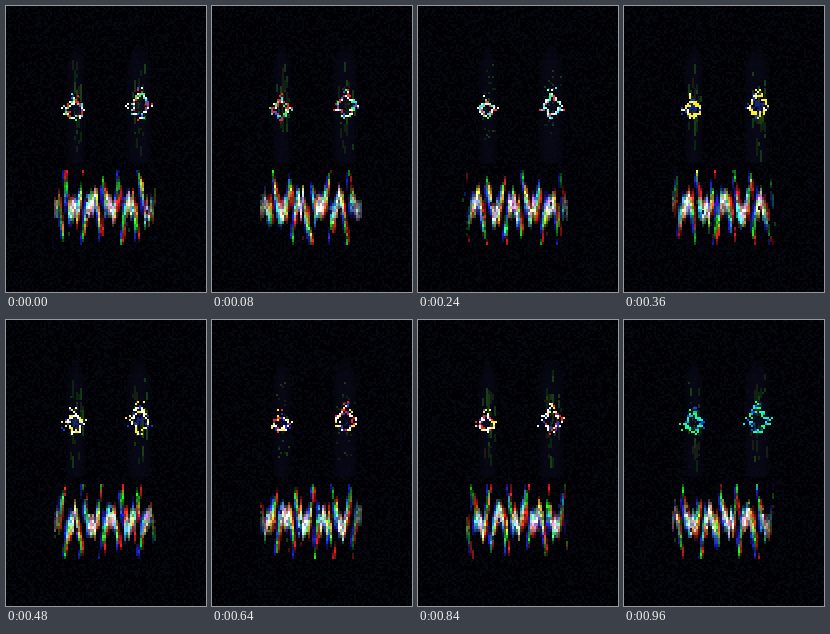
An HTML page with a canvas that plays this animation: 200x286 px, repeating every 1 s.

```html
<!DOCTYPE html>
<html lang="en">
<head>
<meta charset="utf-8">
<title>Glitch face</title>
<style>
html, body { margin: 0; width: 100%; height: 100%; overflow: hidden; background: #000; }
canvas { display: block; width: 200px; height: 286px; image-rendering: pixelated; }
</style>
</head>
<body>
<canvas id="stage" width="200" height="286"></canvas>
<script>
const ctx = document.getElementById('stage').getContext('2d');
const STEP = 40, STEPS = 25;
const TAU = Math.PI * 2;

function seeded(seed) {
  let a = seed * 7919 + 17;
  return () => {
    a = (a + 0x6D2B79F5) | 0;
    let t = Math.imul(a ^ (a >>> 15), 1 | a);
    t = (t + Math.imul(t ^ (t >>> 7), 61 | t)) ^ t;
    return ((t ^ (t >>> 14)) >>> 0) / 4294967296;
  };
}

function box(x, y, w, h, color) {
  ctx.fillStyle = color;
  ctx.fillRect(x, y, w, h);
}

const snap = v => Math.round(v / 2) * 2;
const pick = (list, rnd) => list[Math.floor(rnd() * list.length)];

// Eye colours hold for a stretch of steps; the ring itself flickers.
const mixed = ['#f22', '#f22', '#fff', '#fff', '#2ef', '#3f4', '#35f'];
const pale = ['#fff', '#fff', '#9ff', '#f33', '#3df', '#4f6'];
const gold = ['#fe2', '#fe2', '#fe2', '#fff', '#23c'];
const royal = ['#fff', '#fe2', '#fff', '#23e', '#fe2'];
const warm = ['#fff', '#fff', '#fe2', '#23e', '#f22'];
const ice = ['#1ef', '#2f6', '#14f', '#0bd', '#2f9'];
function palette(n) {
  if (n < 3) return mixed;
  if (n < 7) return pale;
  if (n < 11) return gold;
  if (n < 15) return royal;
  return n < 23 ? warm : ice;
}

function backdrop(rnd) {
  box(0, 0, 200, 286, '#010105');
  for (let y = 0; y < 286; y += 2)
    for (let x = 0; x < 200; x += 2)
      if (rnd() < 0.4) box(x, y, 2, 2, rnd() < 0.8 ? '#05050c' : '#080812');
}

function halo(cx, w, n, rnd) {
  for (let i = 0; i < 3; i++) {
    const inset = i * 3;
    box(cx - w / 2 + inset, 54 - i * 7, w - inset * 2, 102 + i * 8, 'rgba(9,9,26,.35)');
  }
  const dotted = n % 12 >= 3 && n % 12 <= 6;
  for (let i = 0; i < 34; i++) {
    const x = snap(cx + (rnd() + rnd() - 1) * w * 0.42);
    const y = snap(98 + (rnd() + rnd() - 1) * 48);
    const len = dotted ? 2 : 2 + snap(rnd() * 11);
    box(x, y, 2, len, pick(['#0b240d', '#143516', '#1c3c18', '#181c14'], rnd));
  }
}

// A ragged diamond ring with a flecked centre and stray sparks.
function eye(cx, cy, rx, ry, colors, rnd) {
  const dot = (x, y, color) => box(snap(x) - 1, snap(y) - 1, 2, 2, color);
  const core = colors === royal || colors === gold ? '#14208a' : '#0c0c24';
  for (let i = 0; i < 14; i++)
    dot(cx + (rnd() - 0.5) * rx, cy + (rnd() - 0.5) * ry, core);
  for (let i = 0; i < 52; i++) {
    const a = i / 52 * TAU;
    const c = Math.cos(a), s = Math.sin(a);
    const r = (0.68 + rnd() * 0.45) / Math.pow(Math.abs(c) + Math.abs(s), 0.6) * 1.2;
    dot(cx + c * rx * r, cy + s * ry * r, pick(colors, rnd));
  }
  for (let i = 0; i < 5; i++) {
    const side = rnd() < 0.65 ? -1 : 1;
    dot(cx + side * rx * (1.1 + rnd() * 0.6), cy + (rnd() - 0.4) * 10, pick(colors, rnd));
    dot(cx + (rnd() - 0.6) * 8, cy - ry - rnd() * 8, pick(colors, rnd));
  }
}

// Alternating cups and arches that travel right, steep only near their ends.
const HALF = 18.7;
function wave(x) {
  const u = (x - 57) / HALF;
  const k = Math.floor(u);
  const d = Math.abs((u - k) * 2 - 1);
  const sign = k % 2 === 0 ? 1 : -1;
  return 201 + sign * (7 - 44 * Math.pow(d, 2.3));
}

function mouth(shift, rnd) {
  for (let x = 48; x < 150; x += 2) {
    const edge = Math.min(1, (x - 42) / 16, (154 - x) / 20);
    const jitter = (rnd() - 0.5) * 16;
    const curve = [-1.8, 0, 1.8].map(o =>
      wave(x - shift + o + (rnd() - 0.5) * 2) + jitter + (rnd() - 0.5) * 6);
    for (let y = 164; y < 237; y += 3) {
      const mid = Math.max(0, 1 - Math.abs(y - 201) / 30);
      const reach = 9 + 10 * mid;
      const light = 0.5 + rnd() * 0.5;
      const near = curve.map(c => Math.max(0, 1 - Math.abs(y + 1.5 - c) / reach));
      const mean = (near[0] + near[1] + near[2]) / 3;
      const rgb = near.map(v => {
        const soft = v * 0.65 + mean * 0.35;
        return Math.min(255, Math.round(soft * 430 * edge * light * (0.55 + rnd() * 0.6)));
      });
      if (Math.max(...rgb) > 44) box(x, y, 2, 3, `rgb(${rgb})`);
    }
  }
  for (let i = 0; i < 9; i++)
    box(snap(44 + rnd() * 108), snap(178 + rnd() * 52), 2, 4, pick(['#401018', '#123a18', '#101a58'], rnd));
}

function draw(n) {
  const rnd = seeded(n + 1);
  const colors = palette(n);
  const beat = Math.cos(n / 12 * TAU);
  backdrop(rnd);
  halo(70, 18, n, rnd);
  halo(133, 24, n, rnd);
  eye(69, 103.5, 7 + beat * 0.7, 7.5 + beat, colors, rnd);
  eye(134, 100, 8, 10.5 + beat, colors, rnd);
  mouth(2 * HALF * n / 24, rnd);
}

let shown = -1;
function tick() {
  const n = Math.floor(performance.now() / STEP) % STEPS;
  if (n !== shown) draw(shown = n);
  requestAnimationFrame(tick);
}
tick();
</script>
</body>
</html>
```
